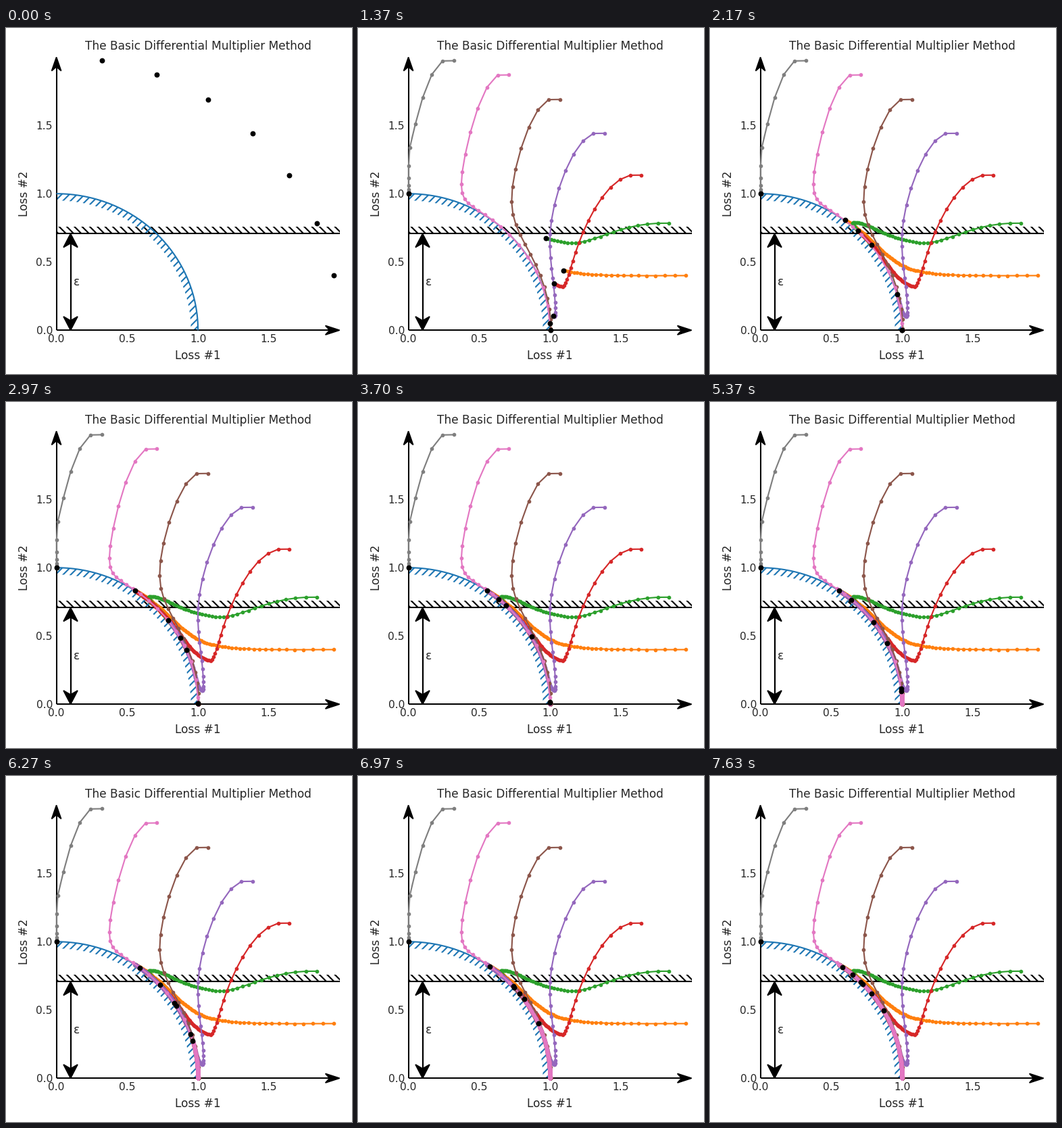
These frames come from a looping animation (512 px wide and 512 px high, 7660 ms). A matplotlib script:

```python
import math

import numpy as np
import matplotlib.pyplot as plt
from matplotlib.animation import FuncAnimation

SIZE = 512
DPI = 102.4
FRAMES = 230
LOOP_MS = 7660
HOLD = 30            # still frames before the descent starts
STEPS_PER_FRAME = 2
RATE = 0.02
EPS = math.sqrt(0.5)
EDGE = 0.001         # the angle stays inside (0, pi/2) by this margin
INK = "#262626"
COLORS = ["tab:orange", "tab:green", "tab:red", "tab:purple",
          "tab:brown", "tab:pink", "tab:gray"]
X0, X1, Y0, Y1 = 74.6, 493.6, 447.2, 43.2   # plot area in pixels
XMID, YMID = (X0 + X1) / 2, (Y0 + Y1) / 2
BIG, SMALL = 11.95, 10.95

plt.rcParams["font.family"] = "DejaVu Sans"
plt.rcParams["hatch.linewidth"] = 1.5


def descend(angle, steps):
    """Gradient descent on the losses, ascent on the multiplier."""
    q, lam = 1.0, 0.0
    path = []
    for _ in range(steps + 1):
        r, s, c = 1 + q * q, math.sin(angle), math.cos(angle)
        path.append((r * c, r * s))
        angle += RATE * r * (s - lam * c)
        angle = min(max(angle, EDGE), math.pi / 2 - EDGE)
        q = max(0.0, q - RATE * 2 * q * (c + lam * s))
        lam = max(0.0, lam + r * s - EPS)
    return np.array(path)


def label(x, y, text, size, ha="center", **kw):
    fig.text(x / SIZE, 1 - y / SIZE, text, fontsize=size, color=INK,
             ha=ha, va="baseline", **kw)


def line(xs, ys, color="black", width=1.45):
    ax.plot(xs, ys, color=color, lw=width, zorder=1.5, clip_on=False,
            solid_capstyle="butt")


def head(tip, direction, length, width):
    """Arrowhead with a notched back."""
    tip, d = np.array(tip), np.array(direction)
    side = np.array([-d[1], d[0]]) * width / 2
    back = tip - d * length
    notch = tip - d * length * 0.7
    ax.fill(*zip(tip, back + side, notch, back - side), fc="black",
            ec="black", lw=1.2, joinstyle="miter", zorder=1.6, clip_on=False)


fig = plt.figure(figsize=(SIZE / DPI, SIZE / DPI), dpi=DPI, facecolor="white")
ax = fig.add_axes([X0 / SIZE, 1 - Y0 / SIZE, (X1 - X0) / SIZE, (Y0 - Y1) / SIZE])
ax.set_xlim(0, 2)
ax.set_ylim(0, 2)
ax.axis("off")

# Text
label(XMID, 31.7, "The Basic Differential Multiplier Method", BIG)
label(XMID, 490, "Loss #1", BIG)
label(31.5, YMID, "Loss #2", BIG, rotation=90, rotation_mode="anchor")
for v in (0, 0.5, 1, 1.5):
    label(X0 + v * (X1 - X0) / 2, 464.6, f"{v:.1f}", SMALL)
    label(69, Y0 - v * (Y0 - Y1) / 2 + 5.6, f"{v:.1f}", SMALL, ha="right")
ax.text(0.12, EPS / 2, "ε", fontsize=BIG, color=INK, va="center")

# Axes and the bound's double arrow
line([0, 1.95], [0, 0])
line([0, 0], [0, 1.95])
head((2, 0), (1, 0), 0.1, 0.067)
head((0, 2), (0, 1), 0.1, 0.067)
line([0.1, 0.1], [0.05, EPS - 0.05], width=1.6)
head((0.1, EPS), (0, 1), 0.1, 0.1)
head((0.1, 0), (0, -1), 0.1, 0.1)

# Hatched bound and Pareto front
line([0, 2], [EPS, EPS])
ax.fill_between([0, 2], EPS, EPS + 0.05, fc="none", ec="black", lw=0,
                hatch="\\\\\\", zorder=1.3)
t = np.linspace(0, math.pi / 2, 120)
rim = np.column_stack([np.cos(t), np.sin(t)])
line(rim[:, 0], rim[:, 1], "tab:blue", 1.5)
ring = np.vstack([rim, 0.95 * rim[::-1]])
ax.fill(ring[:, 0], ring[:, 1], fc="none", ec="tab:blue", lw=0,
        hatch="///", zorder=1.3)

# Descents
last = STEPS_PER_FRAME * (FRAMES - 1 - HOLD)
paths = [descend(0.2014 * (k + 1), last) for k in range(len(COLORS))]
trails = [ax.plot([], [], ".-", color=c, lw=1.5, ms=6, zorder=3,
                  clip_on=False)[0] for c in COLORS]
dots, = ax.plot([], [], ".", color="black", ms=9, zorder=4, clip_on=False)


def update(frame):
    n = STEPS_PER_FRAME * max(0, frame - HOLD)
    for trail, path in zip(trails, paths):
        trail.set_data(path[:n + 1, 0], path[:n + 1, 1])
        trail.set_visible(n > 0)
    now = np.array([path[n] for path in paths])
    dots.set_data(now[:, 0], now[:, 1])
    return trails + [dots]


anim = FuncAnimation(fig, update, frames=FRAMES, interval=LOOP_MS / FRAMES,
                     repeat=True, repeat_delay=0)
plt.show()
```
